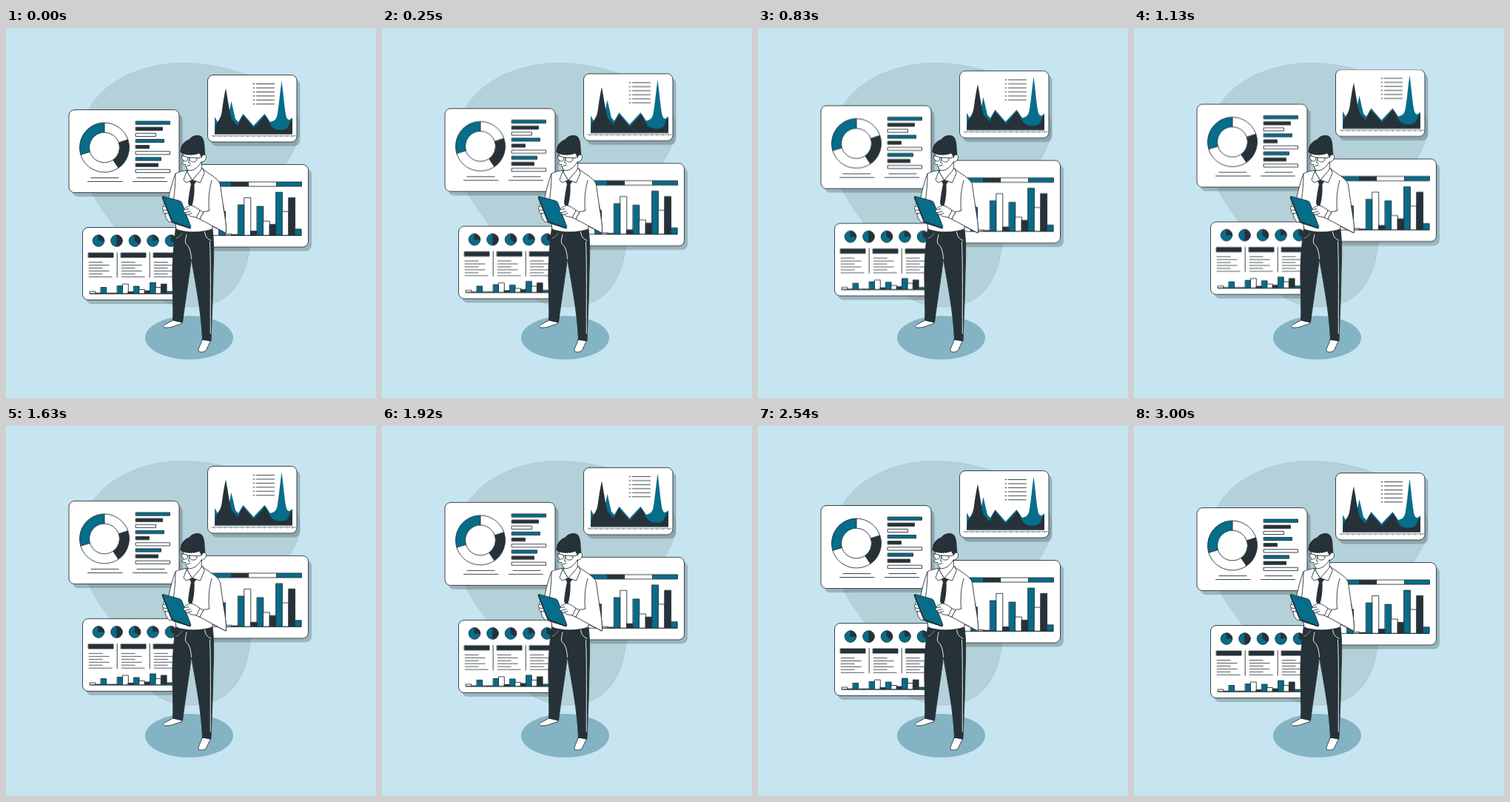
Recreate the animation shown at these times as an HTML page. Size 500 by 500 pixels, loop 3040 ms.

```html
<!DOCTYPE html>
<html lang="en">
<head>
<meta charset="utf-8">
<title>Data dashboard</title>
<style>
html, body { margin: 0; width: 100%; height: 100%; overflow: hidden; background: #c7e5f0; }
svg { display: block; width: 100vw; height: 100vh; }
.ink { stroke: #263238; stroke-width: .9; stroke-linejoin: round; stroke-linecap: round; }
.line { fill: none; }
.dark { fill: #263238; }
.teal { fill: #066d8a; }
.white { fill: #fff; }
.shade { fill: #263238; opacity: .27; }
.crease { fill: none; stroke: #fff; stroke-width: .9; stroke-linecap: round; }
#panels { animation: float 3040ms -5ms infinite; }
/* a 3 s rise and fall at 24 steps a second, then a short rest */
@keyframes float {
  0% { transform: translateY(0); animation-timing-function: steps(36, end); }
  49.342% { transform: translateY(-10px); animation-timing-function: steps(36, end); }
  98.684%, 100% { transform: translateY(0); }
}
</style>
</head>
<body>
<svg viewBox="0 0 500 500">
  <path fill="#b4d1d9" stroke="#a5c3cc" stroke-width=".6" d="M112 110C130 75 180 47 240 47.300C280 48 318 58 345 72C380 90 397 110 397 135C397 165 368 195 350 225C335 250 333 275 329 300C322 345 300 377 250 377C215 377 190 360 180 335C166 301 160 286 147 269C130 245 105 215 102 180C100 150 103 128 112 110Z"/>
  <ellipse cx="247.500" cy="418.500" rx="59.500" ry="29.500" fill="#84b4c3"/>
  <g id="panels"></g>

  <g id="man">
    <!-- shoes -->
    <path class="white ink" d="M226 394.500L238 397L237 400C231 401 224 405.500 216 405C211 404.500 212 402 216 400C220 398 223 396.500 226 394.500Z"/>
    <path class="white ink" d="M265 421L276.500 422.500C275 426 273 430 271 434.500C269 438.500 262 439 260 436.500C259.500 432 264 427 265 421Z"/>
    <!-- trousers -->
    <path class="dark ink" d="M229.500 270L279 272C281 288 281 306 280 330C279.500 365 278 395 277 423L265.500 421C264 385 257 350 250.500 312C247 340 242 370 238.500 398L225.500 395C226.500 378 224.500 350 225 325C225.500 305 227.500 285 229.500 270Z"/>
    <path class="crease" d="M275.500 289C277 325 276 370 276.300 413M268.500 275C269 281 272 285.500 277 287M244 279C242 288 241 291 246 294.500C249 299 250 305 250.500 312"/>
    <path class="crease" d="M238 277C236 281 233 283 230 284" opacity=".5"/>
    <!-- shirt -->
    <path class="white ink" d="M246 192C240 193 233 194 229 197C225 207 221 222 218.500 236L217 247L227 251L230 272C244 277 262 277 278.500 272L279 268L297 277C299 270 293 238 289.500 212C288 205 281 201 266 191Z"/>
    <path class="line ink" d="M229 197C229 210 228 220 226.500 232M278 206C275 216 273 230 274.500 247"/>
    <!-- tie -->
    <path class="dark" d="M246.500 204.500L259 205.500L254.500 211C255 222 254 234 250 244L246 237C247 226 248.500 218 250 211Z"/>
    <!-- neck and collar -->
    <path class="white ink" d="M246 190L245.500 196L252 206L264 193L264.500 182Z"/>
    <path class="white ink" d="M244.500 192.500L240 205L243.500 209L251.500 205.500L245.500 196ZM265.500 189.500L252 205.500L262.500 209L268 196Z"/>
    <!-- face -->
    <path class="white ink" d="M238.500 166C239 171 240.500 175 241.500 178L238 182.500C239 184.500 241 184.500 242.500 184.500C243.500 188 244 191.500 247.500 192.500C254 193 260 188 264 181C268 181.500 271 177 270.500 173.500C269.500 170 266 171 264 174L263 162Z"/>
    <path class="line ink" d="M245 186.500L249 185.500M248 177L246.500 182L249 183"/>
    <path class="dark" d="M235.500 168C235 160 240 153 247.500 150.500C252 144.500 261 142.500 265.500 148C269.500 154 268 163 269.500 171C267 170.500 265.500 172 264.500 175L261 169.500C253 172.500 243 173 235.500 168Z"/>
    <g class="white ink">
      <path d="M237.500 172.500L245.500 174.500C246.500 178 244.500 180.500 241.500 180C238.500 179 237 176 237.500 172.500Z"/>
      <path d="M248 175L258 175.500C258.500 179 256 181.500 252.500 181C249 180.500 247.500 178 248 175Z"/>
      <path class="line" d="M245.500 175L248 175.500M258 176L265 174.500"/>
    </g>
    <!-- hand behind, tablet, forearm in front -->
    <path class="white ink" d="M217 235C213 237 211.500 239 213 241C210.500 243 211 245 213 246C211 248 213 250 215 250.500C215 254 217 260 220.500 262C225 264 230 260 230 254L226 238Z"/>
    <path class="line ink" d="M213 241L219 241M213 246L220 246.500M215 250.500L221 251"/>
    <path class="teal ink" d="M212.500 227.500L234.500 233.500Q236.800 234.300 237.500 236L249.800 268.500Q250.300 271 247.800 270.500L226.500 263.800Q224.500 263 223.700 261L211.300 229.500Q210.800 227.200 212.500 227.500Z"/>
    <path class="line ink" d="M211.500 229L224.500 261.500L248.500 270.500" style="stroke-width:1.500"/>
    <path class="white ink" d="M274.500 247L266.500 248.500L261.500 258L297 277C298.500 270 296 255 293.500 241"/>
    <path class="white ink" d="M266.500 249L258.500 244C254 240.500 249 238.500 246.500 241C244 242 240.500 243 241 245.500C239 247 240 249.500 242.500 249.500C242 251.500 244 253 246.500 252C248 254.500 251 255.500 254 255L261.500 258Z"/>
    <path class="line ink" d="M241 245.500L247 244.500M242.500 249.500L249 247.500M246.500 252L251 250M262 246.500L257.500 256"/>
  </g>
</svg>

<script>
const rect = (x, y, w, h, cls, r = 0) =>
  `<rect x="${x}" y="${y}" width="${w}" height="${h}" rx="${r}" class="${cls}"/>`;
const path = (d, cls, width = .9) =>
  `<path d="${d}" class="${cls}" style="stroke-width:${width}"/>`;
const hline = (x, y, w, width = .9) => path(`M${x} ${y}h${w}`, 'line ink', width);
const panel = (x, y, w, h) =>
  rect(x + 4.5, y + 5.5, w, h, 'shade', 8) + rect(x, y, w, h, 'white ink', 7.5);
const tones = ['teal', 'white', 'dark'];

// clockwise sector, angles in degrees from the top
function sector(cx, cy, r, from, to, hole = 0) {
  const at = (a, q) => {
    const t = a * Math.PI / 180;
    return `${cx + q * Math.sin(t)} ${cy - q * Math.cos(t)}`;
  };
  const big = to - from > 180 ? 1 : 0;
  return `M${at(from, r)}A${r} ${r} 0 ${big} 1 ${at(to, r)}L${at(to, hole)}` +
    (hole ? `A${hole} ${hole} 0 ${big} 0 ${at(from, hole)}` : '') + 'Z';
}

const columns = (x, base, w, heights, first) => heights.map((h, i) =>
  rect(x + i * w, base - h, w, h, tones[(i + first) % 3] + ' ink')).join('');

function donutPanel() {
  let s = panel(85, 110.5, 149, 112);
  [[0, 72, 'white'], [72, 146, 'dark'], [146, 254, 'white'], [254, 360, 'teal']]
    .forEach(([a, b, tone]) => s += path(sector(133, 161.5, 33.5, a, b, 20.5), tone + ' ink'));
  [46, 36, 27, 38, 18, 46, 34, 30, 46].forEach((w, i) =>
    s += rect(175.5, 126 + i * 8.15, w, 4.2, ['teal', 'dark', 'white'][i % 3] + ' ink'));
  return s + hline(115, 202.5, 37) + hline(110.5, 207.5, 46.5) +
    hline(177, 202.5, 37) + hline(171.5, 207.5, 46);
}

function areaPanel() {
  let s = panel(272.5, 63.5, 120.5, 90.5);
  s += path('M282 143.500V120L286 127L300 122L304.500 99L310 123L314 127L320.500 116L334.500 132L349.500 116L357 127C362 126 365 124 366.500 118C369 104 370.500 85 372.500 71.500C374.500 85 376 106 378.500 119C380 124 382 126 387 121V143.500Z', 'teal');
  s += path('M282 143.500L283 133C286 125 290 124 291.500 114C293.500 100 295 90 297 81.500C299 92 301 106 303.500 118C305 126 309 126 313 132L320 118L335 135L350 118C355 123 355 131 361 135C368 139 374 138 379 136C383 133 383 125 387 123V143.500Z', 'dark');
  s += hline(278, 145.8, 113.5, .6);
  for (let i = 0; i < 15; i++) s += path(`M${281 + i * 7.6} 145.800v1.500`, 'line ink', .5);
  for (let i = 0; i < 6; i++) {
    const y = 75.5 + i * 5.45;
    s += hline(338.5, y, 24) + hline(334, y, 2);
  }
  return s;
}

function tablePanel() {
  let s = panel(103.5, 269.5, 130.5, 98);
  [90, 180, 125, 80, 120].forEach((a, i) => {
    const x = 125 + i * 24.5;
    s += `<circle cx="${x}" cy="287.500" r="7.800" class="teal ink"/>` +
      path(sector(x, 287.5, 7.8, 0, a), 'dark ink', .5);
  });
  for (let c = 0; c < 3; c++) {
    const x = 111.5 + c * 44;
    s += rect(x, 304, c < 2 ? 33.5 : 31, 6, 'dark ink');
    [18, 27, 18, 27, 18, 31].forEach((w, i) => s += hline(x + .7, 316.5 + i * 3.95, w, .8));
    if (c < 2) s += path(`M${x + 38.7} 303.500V337`, 'line ink');
  }
  return s + columns(113.5, 359, 7.4,
    [3, .8, 8.5, .8, .8, 10.5, 13, 2.5, 10, 5.5, 4, 15, 8.5, 13, 3], 1) +
    hline(113.5, 359, 118);
}

function barPanel() {
  let s = panel(256, 184.5, 152.5, 111.5);
  [[262, 43, 'teal'], [305, 23, 'dark'], [328, 38, 'white'], [366, 33.5, 'teal']]
    .forEach(([x, w, tone]) => s += rect(x, 208, w, 6, tone + ' ink'));
  return s + columns(288, 280.3, 8.55,
    [32.5, 2, 1.2, 41.3, 51, 6, 39.3, 19.3, 15, 58.3, 32.3, 51, 8.5], 0) +
    hline(262, 280.3, 137);
}

document.getElementById('panels').innerHTML =
  donutPanel() + areaPanel() + tablePanel() + barPanel();
</script>
</body>
</html>
```
